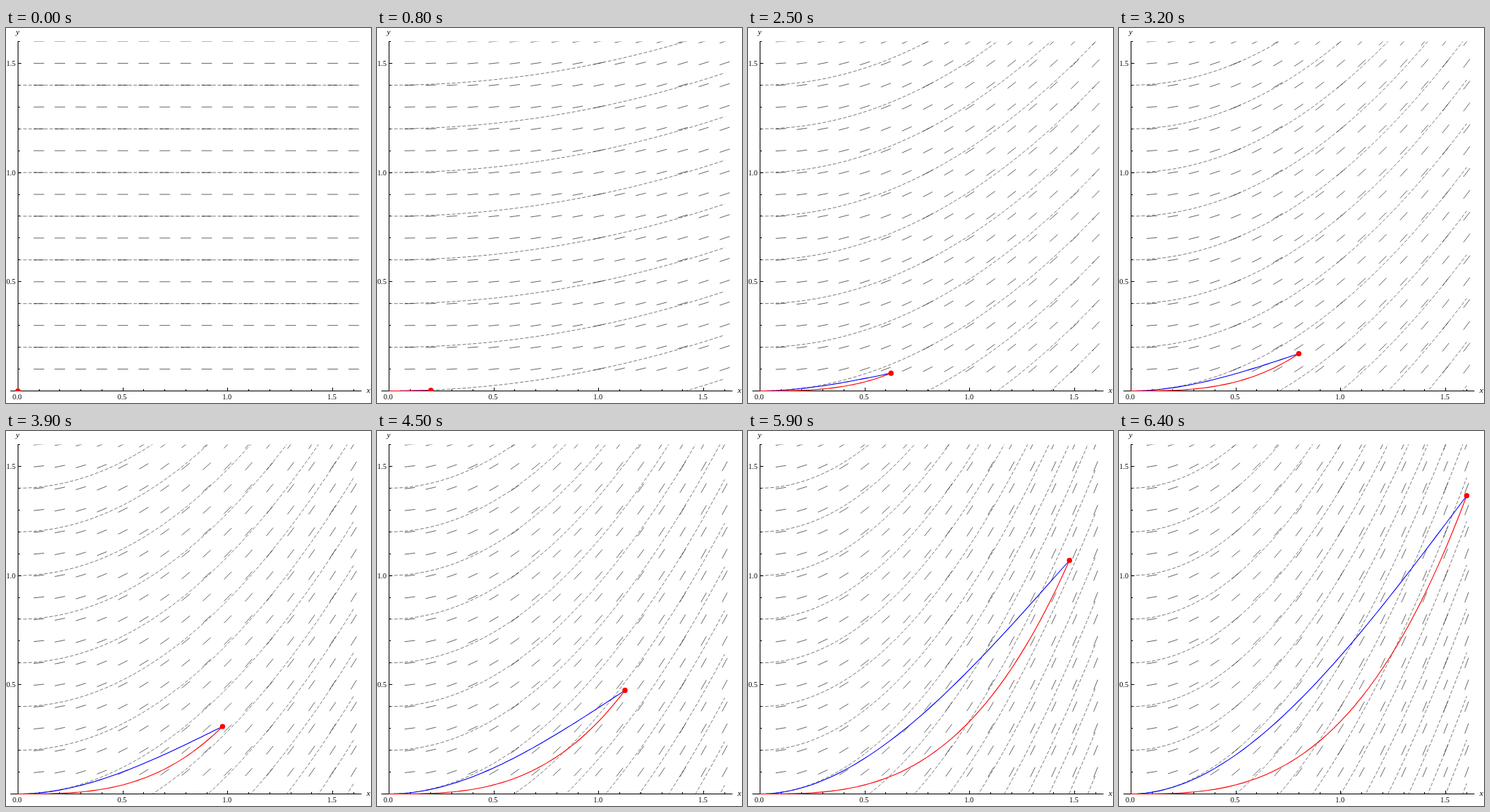
An HTML page for the animation above (7900 ms loop, 500x514 px).

```html
<!DOCTYPE html>
<html lang="en">
<head>
<meta charset="utf-8">
<title>Streamlines, pathline and streakline</title>
<style>
  html, body { margin: 0; width: 100%; height: 100%; overflow: hidden; background: #fff; }
  svg { display: block; width: 500px; height: 514px; }
  path { fill: none; }
  text { font: 10px "Liberation Serif", "Times New Roman", serif; }
  .name { font-style: italic; font-size: 11px; }
  .middle { text-anchor: middle; }
  .end { text-anchor: end; }
</style>
</head>
<body>
<svg viewBox="0 0 500 514">
  <clipPath id="frame"><rect x="6" y="18.4" width="481" height="479.6"/></clipPath>
  <g id="axes">
    <path id="ticks" stroke="#000"/>
    <text class="name middle" x="16" y="9">y</text>
    <text class="name middle" x="496.5" y="500">x</text>
  </g>
  <g clip-path="url(#frame)">
    <path id="field" stroke="#000" stroke-width=".6"/>
    <path id="streamlines" stroke="#000" stroke-opacity=".8" stroke-width=".65" stroke-dasharray="4.8 2.4"/>
    <path id="streakline" stroke="#00f" stroke-width="1.1"/>
    <path id="pathline" stroke="#f00" stroke-width="1.1"/>
    <circle id="particle" r="3.6" fill="#f00"/>
  </g>
</svg>
<script>
// Velocity field (1, t·x): the particle starts at the origin at t = 0.
const MAX = 1.6, STEP_MS = 100, STEPS = 64, LOOP_MS = 7900;
const $ = id => document.getElementById(id);
const px = x => 16.3 + 287.5 * x;
const py = y => 497.5 - 299.4 * y;
const point = (x, y) => px(x).toFixed(2) + " " + py(y).toFixed(2);

function curve(f, end) {
  const n = 48, points = [];
  for (let i = 0; i <= n; i++) points.push(point(end * i / n, f(end * i / n)));
  return "M" + points.join("L");
}

function fieldPath(t) {
  let d = "";
  for (let i = 1; i <= 16; i++) {
    const x = i / 10, slope = t * x;
    const dx = 0.025 / Math.hypot(1, slope), dy = slope * dx;
    for (let j = 1; j <= 16; j++) {
      const y = j / 10;
      d += `M${point(x - dx, y - dy)}L${point(x + dx, y + dy)}`;
    }
  }
  return d;
}

function streamlinePath(t) {
  let d = "";
  for (let k = -10; k <= 7; k++) d += curve(x => k / 5 + t * x * x / 2, MAX);
  return d;
}

function addLabel(className, x, y, value) {
  const label = document.createElementNS("http://www.w3.org/2000/svg", "text");
  label.setAttribute("class", className);
  label.setAttribute("x", x);
  label.setAttribute("y", y);
  label.textContent = value.toFixed(1);
  $("axes").append(label);
}

function drawAxes() {
  let d = "M6 497.5H487M16.5 498V18";
  for (let i = 0; i <= 16; i++) {
    const v = i / 10, major = i % 5 === 0, length = major ? 4.5 : 2.5;
    const x = Math.floor(px(v)) + 0.5, y = Math.floor(py(v)) + 0.5;
    d += `M${x} 497.5v${-length}M16.5 ${y}h${length}`;
    if (!major) continue;
    addLabel("middle", px(v) - 1, 509, v);
    if (i) addLabel("end", 13, y + 3, v);
  }
  $("ticks").setAttribute("d", d);
}

function draw(t) {
  const setPath = (id, d) => $(id).setAttribute("d", d);
  setPath("field", fieldPath(t));
  setPath("streamlines", streamlinePath(t));
  setPath("streakline", curve(x => t * x * x / 2 - x ** 3 / 6, t));
  setPath("pathline", curve(x => x ** 3 / 3, t));
  $("particle").setAttribute("cx", px(t));
  $("particle").setAttribute("cy", py(t ** 3 / 3));
}

let shown = -1;
const start = performance.now();
function tick() {
  const elapsed = (performance.now() - start) % LOOP_MS;
  const step = Math.min(STEPS, Math.floor(elapsed / STEP_MS));
  if (step !== shown) draw(MAX * (shown = step) / STEPS);
  requestAnimationFrame(tick);
}

drawAxes();
tick();
</script>
</body>
</html>
```
